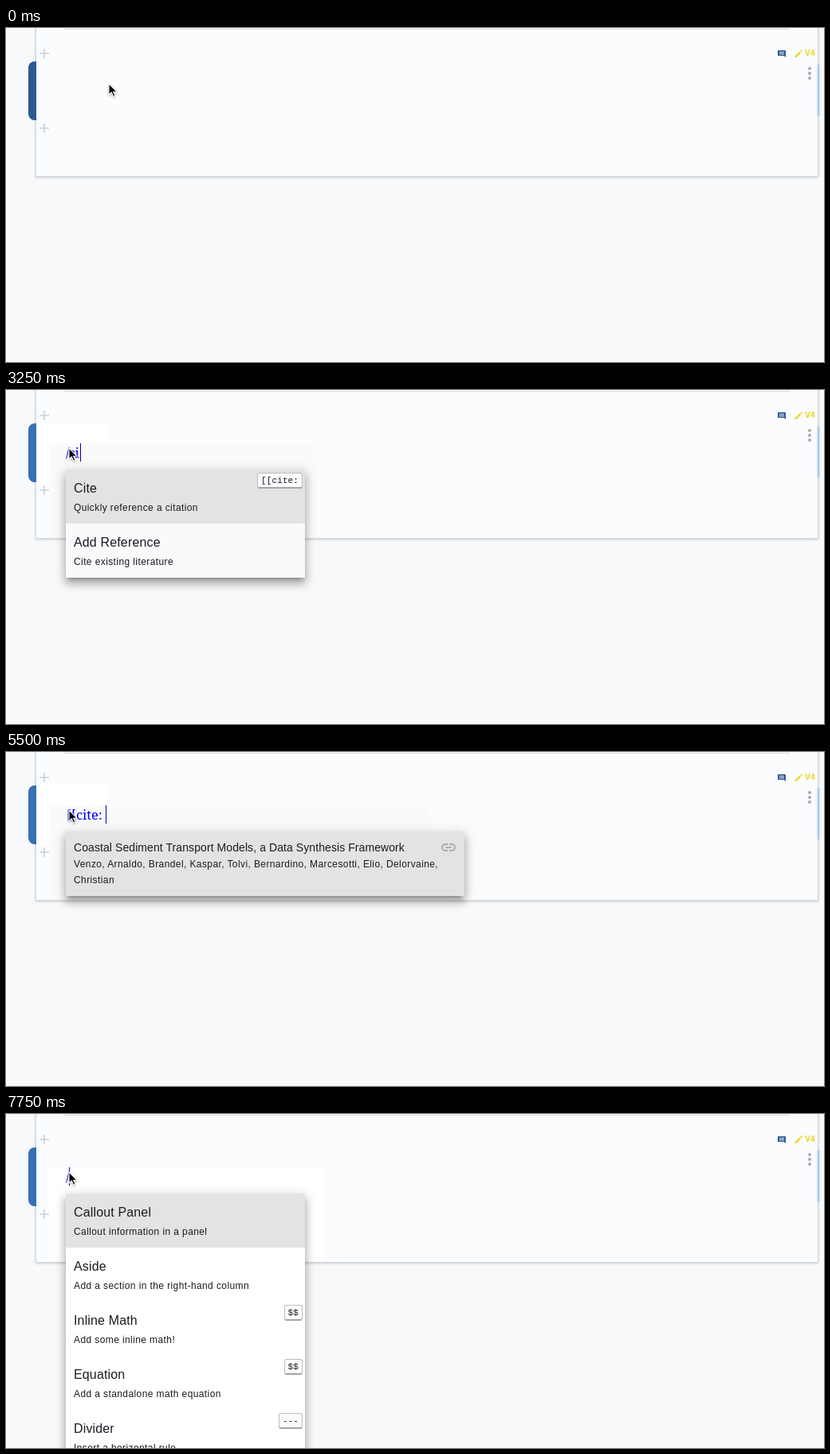
An HTML page for the animation above (8000 ms loop, 1026 by 420 pixels).

```html
<!DOCTYPE html>
<html lang="en">
<head>
<meta charset="utf-8">
<title>Citing from the editor</title>
<style>
  html, body { margin: 0; width: 100%; height: 100%; overflow: hidden; background: #f7f9fb; }
  #stage { position: relative; width: 1026px; height: 420px; overflow: hidden; font-family: "Liberation Sans", Arial, sans-serif; color: #1b1b22; }
  #stage > *, .patch { position: absolute; }
  #panel { left: 37px; top: -20px; width: 980px; height: 205px; background: #fafcfe; border: 1px solid #d5d9dd; box-shadow: 0 1px 3px #0003; }
  #rule { left: 73px; top: 1px; width: 910px; height: 1px; background: #d7d9dc; }
  #bar { left: 28px; top: 42px; width: 10px; height: 74px; border-radius: 8px 0 0 8px; }
  #glow { left: 1018px; top: 46px; width: 2px; height: 64px; background: #a6c6e4; box-shadow: 0 0 3px #b3cfe8; }
  #icons { left: 0; top: 0; }
  #version { left: 1002px; top: 25px; font: bold 10.5px/14px Roboto, sans-serif; color: #ecd92f; }
  #line { left: 76px; top: 67px; height: 23px; font: 16.5px/23px "Noto Serif", serif; color: #00f; white-space: pre; }
  #line .slash { margin: 0 -1.4px 0 -1px; }
  #line .cite { display: inline-block; padding: 0 2px; margin-left: -2px; background: #eef2fb; outline: 1px solid #a9c3e6; }
  #caret { top: 67px; width: 1px; height: 23px; }
  .popup { left: 75px; top: 100px; background: #f9fafc; white-space: nowrap;
    box-shadow: 0 5px 5px -3px #0004, 0 8px 10px 1px #0003, 0 3px 14px 2px #0002; }
  .item { position: relative; height: 68px; }
  .on { background: #e3e3e3; }
  .item b, .item span { position: absolute; left: 10px; font-weight: 400; }
  .item b { top: 14px; font-size: 16px; line-height: 20px; letter-spacing: .15px; }
  .item span { top: 39px; }
  .small { font-size: 12px; line-height: 18px; letter-spacing: .4px; }
  kbd { position: absolute; right: 3px; top: 4px; padding: 0 4px; height: 17px; font: 11px/19px "Liberation Mono", monospace;
    background: #fafbfc; border: 1px solid #b9bcc0; border-bottom: 2px solid #a3a6aa; border-radius: 3px; letter-spacing: .1px; }
  .lead { position: absolute; left: 10px; top: 11px; font-size: 14px; line-height: 18px; letter-spacing: .08px; }
  .authors { position: absolute; left: 10px; top: 31px; line-height: 20px; }
  .year { position: absolute; left: 10px; top: 84px; color: #666; }
  .chain { position: absolute; left: 470px; top: 10px; }
</style>
</head>
<body>
<div id="stage">
  <div id="panel"></div>
  <div id="rule"></div>
  <div id="patches"></div>
  <div id="bar"></div>
  <div id="glow"></div>
  <svg id="icons" width="1026" height="190">
    <path d="M42 32h12M48 26v12M42 126h12M48 120v12" stroke="#cdd0d3" stroke-width="1.6"/>
    <path d="M969 28h8q1 0 1 1v8l-2-2h-7q-1 0-1-1v-5q0-1 1-1z" fill="#2b5a92"/>
    <path d="M970 30h6M970 31.600h6M970 33.200h6" stroke="#fff" stroke-width=".7"/>
    <path d="M989.500 37v-1.800l5.800-5.800 1.800 1.800-5.800 5.800zM996 28.700l.9-.9q.5-.4.9 0l.9.9q.4.400 0 .9l-.9.9z" fill="#ecd92f"/>
    <g fill="#a9abae"><circle cx="1008" cy="51" r="2"/><circle cx="1008" cy="57" r="2"/><circle cx="1008" cy="63" r="2"/></g>
  </svg>
  <div id="version">V4</div>
  <div id="line"></div>
  <div id="caret"></div>
  <div id="popup" class="popup"></div>
  <svg id="mouse" width="16" height="22" viewBox="-2 -2 16 22">
    <path d="M0 0V14L3.300 11 5.600 16.300 8 15.300 5.700 10.200H10z" fill="#000" stroke="#fff" stroke-width="1.1" style="filter:drop-shadow(0 1px 1px #0005)"/>
  </svg>
</div>
<script>
const $ = id => document.getElementById(id);
const LOOP = 8000;

const item = ([title, note, key], i) =>
  `<div class="item${i ? '' : ' on'}"><b>${title}</b><span class="small">${note}</span>${key ? `<kbd>${key}</kbd>` : ''}</div>`;
const menu = (...rows) => ({ w: 300, h: rows.length * 68, html: rows.map(item).join('') });

const cite = ['Cite', 'Quickly reference a citation', '[[cite:'];
const addRef = ['Add Reference', 'Cite existing literature'];
const paper = `<div class="lead">Coastal Sediment Transport Models, a Data Synthesis Framework</div>
  <div class="authors small">Venzo, Arnaldo, Brandel, Kaspar, Tolvi, Bernardino, Marcesotti, Elio, Delorvaine,<br>Christian</div>`;
const chain = `<svg class="chain" width="20" height="20" fill="none" stroke="#aaa" stroke-width="1.8">
  <path d="M9 6H6a4 4 0 0 0 0 8h3M11 6h3a4 4 0 0 1 0 8h-3M6.500 10h7"/></svg>`;

const popups = {
  all: { ...menu(
    ['Callout Panel', 'Callout information in a panel'],
    ['Aside', 'Add a section in the right-hand column'],
    ['Inline Math', 'Add some inline math!', '$$'],
    ['Equation', 'Add a standalone math equation', '$$'],
    ['Divider', 'Insert a horizontal rule', '---']), bg: '#fff' },
  two: menu(cite, addRef),
  three: menu(cite, addRef, ['Add Citation', 'Insert a new citation']),
  hint: { w: 434, h: 41, html: '<div class="lead">Start typing to search through your links, references and citations.</div>' },
  result: { w: 500, h: 81, bg: '#e3e3e3', html: paper + chain },
  card: { w: 531, h: 121, bg: '#fff', html: paper + '<div class="year small">2019</div>' }
};

// Background areas: x, y, width, height, colour
const cell = [38, 42, 88, 75, '#fff'];
const areas = {
  none: [],
  click: [cell, [126, 67, 15, 25, '#fff']],
  open: [cell, [53, 67, 344, 119, '#fff']],
  filter: [cell, [54, 67, 338, 119, '#fafafa']],
  hint: [cell, [54, 67, 476, 119, '#fafafa']],
  result: [cell, [54, 67, 476, 119, '#fafafa'], [530, 83, 67, 103, '#fafbfb']],
  wide: [cell, [53, 65, 574, 121, '#fff']],
  menu: [[53, 67, 344, 119, '#fff']]
};

const slash = s => `<span class="slash">/</span>${s}`;
const link = '[[cite: ';

// Each step changes only the listed properties
const steps = [
  [0, { mouse: [129, 70], bar: '#2b5a92', caret: 0, text: '', popup: '', area: 'none' }],
  [250, { mouse: [120, 73] }],
  [500, { mouse: [114, 74] }],
  [750, { mouse: [79, 73], bar: '#3065a3', caret: 75, area: 'click' }],
  [1000, { bar: '#3671b5' }],
  [1250, { caret: 0 }],
  [1750, { caret: 75 }],
  [2250, { caret: 79, text: slash(''), popup: 'all', area: 'open' }],
  [2750, { caret: 0 }],
  [3250, { caret: 93, text: slash('ci'), popup: 'two', area: 'filter' }],
  [3500, { caret: 108, text: slash('cite'), popup: 'three' }],
  [4000, { caret: 0 }],
  [4500, { caret: 125, text: link, popup: 'hint', area: 'hint' }],
  [4750, { popup: 'result', area: 'result' }],
  [5000, { caret: 0 }],
  [5500, { caret: 125 }],
  [5750, { caret: 0, text: '<span class="cite">(Venzo et al., 2019)</span>', popup: 'card', area: 'wide' }],
  [6750, { caret: 75, text: '', popup: '' }],
  [7250, { caret: 0 }],
  [7500, { area: 'none' }],
  [7750, { caret: 79, text: slash(''), popup: 'all', area: 'menu' }]
];

let state = {};
const scenes = steps.map(([at, change]) => ({ at, ...(state = { ...state, ...change }) }));

function draw(s) {
  $('mouse').style.left = s.mouse[0] - 2 + 'px';
  $('mouse').style.top = s.mouse[1] - 2 + 'px';
  $('bar').style.background = s.bar;
  $('caret').style.display = s.caret ? 'block' : 'none';
  $('caret').style.left = s.caret + 'px';
  $('caret').style.background = s.text ? '#0000b0' : '#000';
  $('line').innerHTML = s.text;
  $('patches').innerHTML = areas[s.area].map(([x, y, w, h, c]) =>
    `<div class="patch" style="left:${x}px;top:${y}px;width:${w}px;height:${h}px;background:${c}"></div>`).join('');
  const p = popups[s.popup], box = $('popup');
  box.style.display = p ? 'block' : 'none';
  if (!p) return;
  box.innerHTML = p.html;
  box.style.width = p.w + 'px';
  box.style.height = p.h + 'px';
  box.style.background = p.bg || '';
}

const start = performance.now();
let shown;
function tick() {
  const t = (performance.now() - start) % LOOP;
  const scene = scenes.findLast(s => s.at <= t);
  if (scene !== shown) draw(shown = scene);
  requestAnimationFrame(tick);
}
tick();
</script>
</body>
</html>
```
